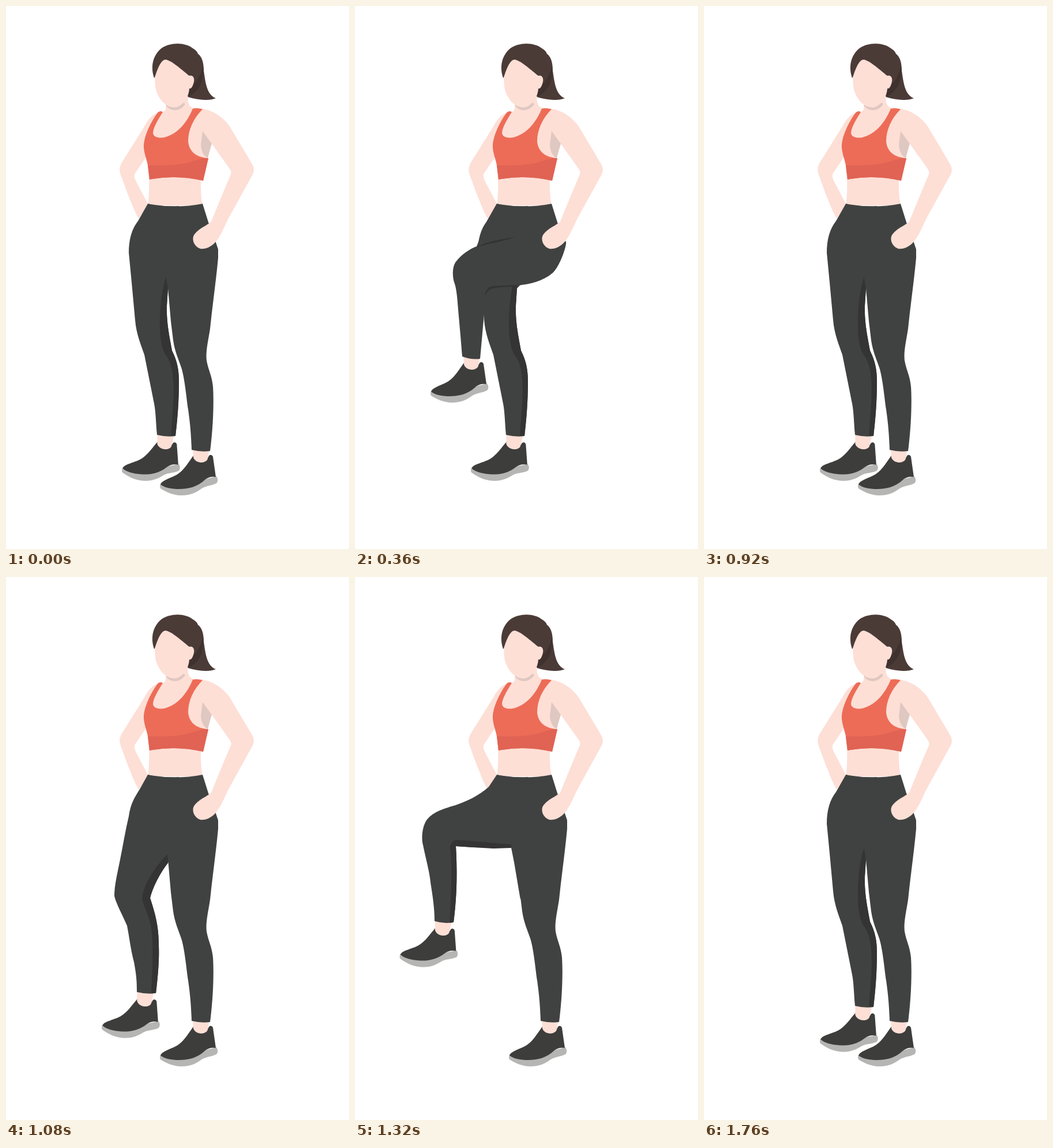
Animation of 595 by 942 pixels, one loop 1880 ms. Source, as an HTML page:

```html
<!DOCTYPE html>
<html lang="en">
<head>
<meta charset="utf-8">
<title>Standing knee raises</title>
<style>
html, body { margin: 0; width: 100%; height: 100%; overflow: hidden; background: #fff; }
svg { display: block; width: 100%; height: 100%; }
.skin { fill: #fddfd6; }
.skinShade { fill: #dfc8c1; }
.hair { fill: #4b3b37; }
.hairShade { fill: #3f312e; }
.top { fill: #ed6c57; }
.band { fill: #e06354; }
.pants { fill: #404241; }
.dark { fill: #343434; }
.shoe { fill: #3d3d3c; }
.sole { fill: #b5b5b4; }
</style>
</head>
<body>
<svg viewBox="0 0 595 942">
  <defs>
    <g id="foot">
      <path class="sole" d="M1-4C20 6 60 2 78-12L98-17C101-13 101-8 98-5C90-1 82-1 74 3C64 10 55 16 37 16C22 16 9 9 1 4Q-1 0 1-4Z"/>
      <path class="shoe" d="M1-3C4-11 18-13 31-21C43-29 51-44 58-53L84-50C85-56 91-55 92-51L97-16C88-17 83-15 78-11C64 2 48 5 33 5C21 5 8 3 1-3Z"/>
      <path class="skin" d="M57-66H86L83-48C81-39 62-38 58-50Z"/>
    </g>
  </defs>

  <path class="skin" d="M268 184C255 186 247 196 240 209L200 273Q195 283 199 293Q210 325 223 355L230 369L247 345L225 303Q221 295 224 290L243 262L262 200Z"/>
  <path class="skin" d="M264 186Q277 184 277 178L278 165L316 155Q313 173 326 178L345 200L350 264L338 303Q337 325 341 346H246Q249 325 248 298L242 240Z"/>

  <use id="footL" href="#foot"/>
  <path id="legL" class="pants"/>
  <path id="shadeL" class="dark"/>
  <use id="footR" href="#foot"/>
  <path id="legR" class="pants"/>
  <path id="shadeR" class="dark"/>

  <path class="skin" d="M326 178H340C360 181 380 195 390 212L428 276Q432 285 428 292L385 370C378 385 371 402 362 411C353 420 344 422 337 421C326 417 321 404 327 396C335 385 349 381 356 374L374 330L390 292Q392 288 387 281L357 239L340 262L318 240Z"/>
  <path class="skinShade" d="M341 217L357 239C354 249 352 256 350 264Q339 258 338 240Z"/>
  <path class="top" d="M264 184Q269 181 272 184C262 200 255 212 255 221C257 229 268 230 278 227C300 220 315 200 324 178Q332 176 341 179C325 195 316 215 316 235C318 255 333 263 351 264L342 303Q295 292 249 301L246 276C244 266 238 252 239 240C241 220 255 195 264 184Z"/>
  <path class="band" d="M246 276C270 277 290 277 310 273C325 270 338 263 351 264L342 303Q295 292 249 301Z"/>

  <path class="hair" d="M257 125C250 105 255 85 270 73C285 63 310 62 325 74C330 77 332 80 333 83C340 88 343 98 343 112C346 132 348 154 364 160C352 165 332 163 316 158L300 125L277 100Z"/>
  <path class="hairShade" d="M342 104C344 125 339 146 317 157L318 140C330 135 338 120 342 104Z"/>
  <path class="skinShade" d="M277 172C285 184 302 184 311 170L300 160Z"/>
  <path class="skin" d="M258 124C262 112 268 93 277 93C289 95 307 113 318 121C326 119 328 127 325 135C323 142 320 144 318 143C317 160 305 175 293 176C275 176 262 158 259 140Z"/>
</svg>
<script>
const LOOP = 1880;
const $ = id => document.getElementById(id);

const WAIST_L = 'M300 347Q270 349 246 343';
const WAIST_R = 'M246 343Q294 352 341 343L351 375L363 407';

// Poses run from standing (0) to knee fully raised (3).
const left = [
  { foot: [201, 805],
    leg: 'L229 373C218 387 213 405 213 428L218 480L224 545C226 570 235 590 240 605L249 650L257 690C260 705 260 725 262 744Q278 748 294 746C297 720 300 690 300 650C300 625 294 610 288 598C284 575 278 550 279 520L281 490L300 470Z',
    shade: 'M278 470C270 490 266 530 267 560C268 585 272 600 279 608C290 625 292 650 290 690L286 746H294C297 720 300 690 300 650C300 625 294 610 288 598C284 575 278 550 279 520L281 490Z' },
  { foot: [166, 781],
    leg: 'L232 368C222 384 216 394 213 415C207 440 203 465 198 490C193 515 188 535 188 553C190 565 204 590 210 605C214 625 216 645 222 668C226 690 227 700 227 720Q243 724 260 722C264 690 266 660 265 640C265 610 261 590 250 557C254 540 266 515 281 496L300 470Z',
    shade: 'M281 480C258 502 238 535 236 557C238 572 250 590 252 610C256 640 254 680 252 722H260C264 690 266 660 265 640C265 610 261 590 250 557C254 540 266 515 281 496Z' },
  { foot: [119.5, 735],
    leg: 'L235 362C215 395 190 435 168 464C154 482 150 490 151 510C152 530 157 545 164 562C167 590 175 616 177 640Q180 660 180 674Q197 678 213 676C217 640 219 610 219 590C219 565 215 545 209 528C215 510 240 495 275 475L277 500L287 550L300 480Z',
    shade: 'M275 465C245 475 200 505 193 532C198 540 206 552 208 575C211 610 208 645 206 677L213 676C217 640 219 610 219 590C219 565 215 545 209 528C215 510 240 495 275 475Z' },
  { foot: [77.5, 658],
    leg: 'L232 364C214 380 194 389 174 396C149 403 134 409 124 422C116 434 115 455 118 465C123 490 129 510 131 530C135 555 138 575 138 597Q155 602 171 599C176 560 178 520 175 467L205 469L271 470L276 495L287 560L300 480Z',
    shade: 'M271 464L225 460L177 456Q168 456 165 468C168 500 168 540 164 600L171 599C176 560 178 520 175 467L205 469L240 471L271 470Z' }
];

const right = [
  { foot: [267, 833],
    leg: 'L368 422V437C364 480 358 520 354 560C351 580 346 600 348 615C351 632 357 640 359 660C361 690 359 735 354 772Q338 774 322 770C321 735 318 715 316 700C313 680 310 645 304 627C299 612 293 600 290 580L286 547L281 490L278 470Z',
    shade: '' },
  { foot: [220, 818],
    leg: 'C372 425 377 440 376 465C376 475 372 482 366 490L340 536L314 584C308 594 303 604 304 609C311 622 313 650 313 670C313 700 310 735 307 758Q290 760 275 757V746L262 680L255 600L262 560L267 535C272 515 276 500 279 470L214 428C214 405 219 388 229 374Z',
    shade: '' },
  { foot: [172, 759],
    leg: 'C372 425 374 440 368 455C360 475 345 490 325 505C300 522 275 545 263 562C262 575 268 600 268 625C268 650 263 680 259 699Q243 700 227 696C226 670 222 640 217 615C212 590 203 570 201 548C201 525 210 500 214 480V428C214 405 219 388 229 374Z',
    shade: '' },
  { foot: [131, 672],
    leg: 'Q367 407 366 413C363 430 352 455 343 463C325 478 305 482 282 485Q250 486 237 488Q228 492 225 502L223 545L217 612Q202 614 186 608C184 580 180 540 178 515C177 500 175 488 173 482C169 472 168 455 174 445C184 431 200 421 211 417C217 402 224 385 230 371Z',
    shade: 'M211 418C232 407 255 404 278 401C255 409 235 412 211 418ZM282 484Q250 485 237 486Q226 490 225 503Q230 493 238 490Q255 487 282 487Z' }
];

// [start ms, left pose, right pose]
const steps = [
  [0, 0, 0], [120, 0, 1], [240, 0, 2], [360, 0, 3], [520, 0, 2], [640, 0, 1], [760, 0, 0],
  [1080, 1, 0], [1200, 2, 0], [1320, 3, 0], [1520, 2, 0], [1640, 1, 0], [1760, 0, 0]
];

function setLeg(side, pose, waist, tilt) {
  $('leg' + side).setAttribute('d', waist + pose.leg);
  $('shade' + side).setAttribute('d', pose.shade);
  $('foot' + side).setAttribute('transform', `translate(${pose.foot}) rotate(${tilt})`);
}

let shown;
function draw(now) {
  const t = now % LOOP;
  const step = steps.findLast(s => s[0] <= t);
  if (step !== shown) {
    shown = step;
    setLeg('L', left[step[1]], WAIST_L, 4);
    setLeg('R', right[step[2]], WAIST_R, 0);
  }
}

const begin = performance.now();
function tick() {
  draw(performance.now() - begin);
  requestAnimationFrame(tick);
}
tick();
</script>
</body>
</html>
```
